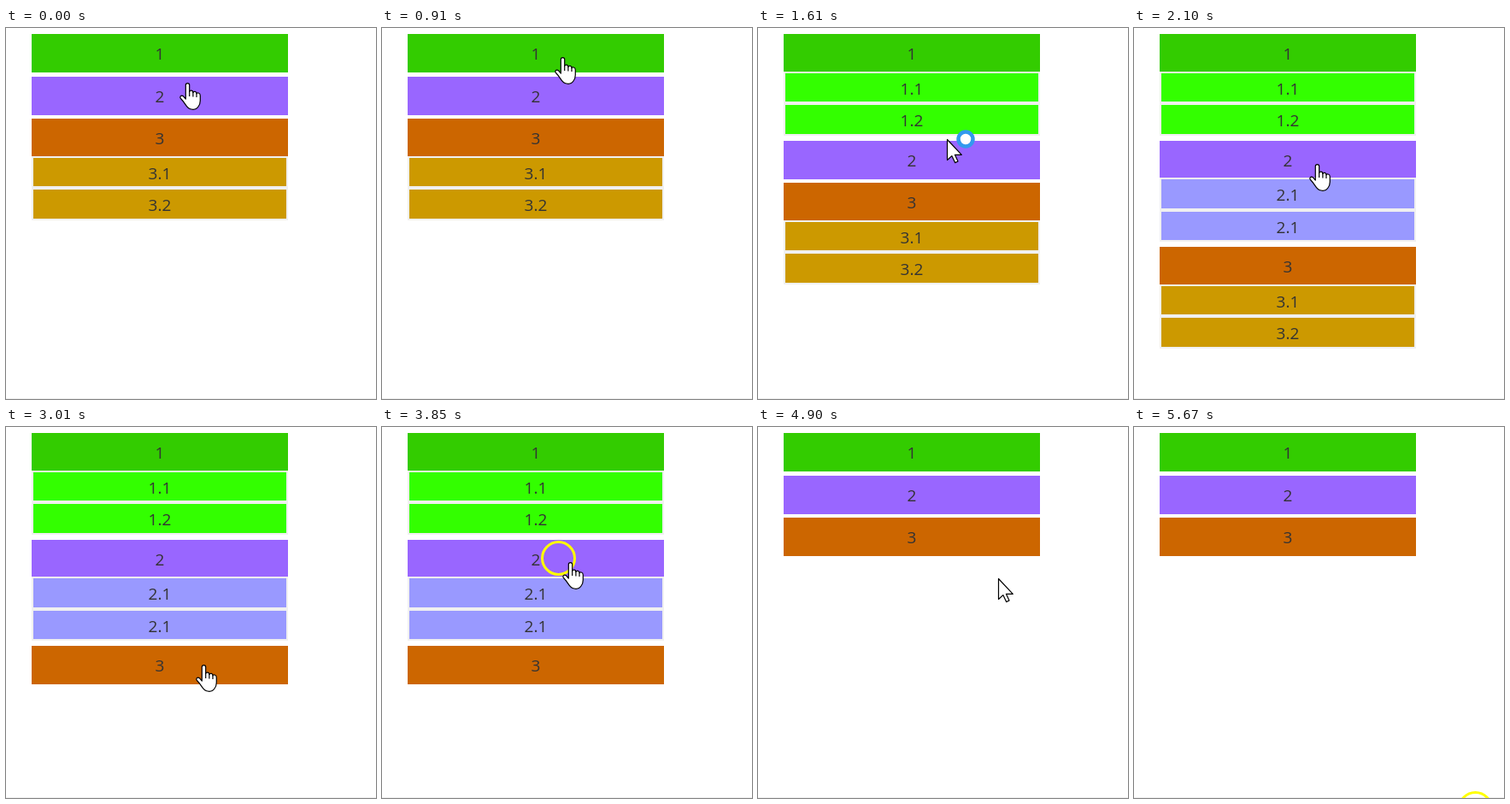
An HTML page with a canvas for the animation above (5.81 s loop, 433 by 434 pixels).

```html
<!DOCTYPE html>
<html lang="en">
<head>
<meta charset="utf-8">
<title>Accordion menu</title>
<style>
  html, body { margin: 0; width: 100%; height: 100%; overflow: hidden; background: #fff; }
  canvas { display: block; }
</style>
</head>
<body>
<canvas id="stage" width="433" height="434"></canvas>
<script>
const ctx = document.getElementById('stage').getContext('2d');
const LOOP = 5810, STEP = 70;
const LEFT = 30, WIDTH = 300, TOP = 7, PITCH = 49.6, PANEL = 75.1;

const menu = [
  { label: '1', head: '#33cc00', body: '#33ff00', items: ['1.1', '1.2'], open: [980, 4690] },
  { label: '2', head: '#9966ff', body: '#9999ff', items: ['2.1', '2.1'], open: [2100, 3990] },
  { label: '3', head: '#cc6600', body: '#cc9900', items: ['3.1', '3.2'], open: [0, 3010] }
];

const start = { x: 203, y: 64 };
const moves = [
  { at: 140, steps: 5, x: 202, y: 41, bow: 2 },
  { at: 560, steps: 4, x: 202, y: 34, bow: 0 },
  { at: 1330, steps: 8, x: 205, y: 159, bow: 9.5, busy: true },
  { at: 2380, steps: 6, x: 222, y: 278, bow: 2, busy: true },
  { at: 3220, steps: 6, x: 211, y: 158, bow: 0 },
  { at: 4200, steps: 5, x: 199, y: 29, bow: 0 },
  { at: 4830, steps: 8, x: 404, y: 451, bow: 0 }
];

const clicks = [[840, 910], [1960, 2100], [2870, 3010], [3850, 3990], [4620, 4690], [5670, LOOP]];

const handShape = new Path2D(
  'M7.3 19 V2.8 Q7.3 .7 9.5 .7 Q11.7 .7 11.7 2.8 V10.5 Q12 9 14 9.2 Q15.9 9.4 15.9 11.5' +
  ' Q16.3 10 18.2 10.4 Q20 10.8 20 12.8 Q20.5 11.4 22.3 12 Q24.3 12.6 24.3 15 V21' +
  ' Q24.3 25 22 28 Q19.8 31.3 16 31.3 Q11.5 31.3 9 28.2 C6.5 25 4.5 21.5 1.5 18.5' +
  ' Q.2 17 1.2 15.8 Q2.6 14.4 4.6 15.8 Z');
const knuckles = new Path2D('M11.7 10 V16 M15.9 11 V16.5 M20 12.5 V17');
const arrowShape = new Path2D('M.5 .5 V24.5 L5.8 19.6 L9.6 27.6 L13 26 L9.4 18.3 H17.3 Z');

const inside = (t, [from, to]) => t >= from && t < to;
const within = (v, a, b) => v >= a && v < b;

function layout(t) {
  let y = TOP;
  return menu.map(m => {
    const row = { ...m, y, shown: inside(t, m.open) };
    y += PITCH + (row.shown ? PANEL : 0);
    return row;
  });
}

function cursorAt(t) {
  let pos = { ...start, busy: false };
  for (const m of moves) {
    if (t < m.at) break;
    const k = Math.min(1, (Math.floor((t - m.at) / STEP) + 1) / m.steps);
    const u = 1 - Math.pow(1 - k, 1.5);
    pos = {
      x: pos.x + (m.x - pos.x) * u + m.bow * 4 * u * (1 - u),
      y: pos.y + (m.y - pos.y) * u,
      busy: !!m.busy
    };
  }
  return { x: Math.round(pos.x), y: Math.round(pos.y), busy: pos.busy };
}

function bar(color, x, top, w, bottom) {
  const y = Math.round(top);
  ctx.fillStyle = color;
  ctx.fillRect(x, y, w, Math.round(bottom) - y);
}

function label(text, middle, color = '#333') {
  ctx.fillStyle = color;
  ctx.fillText(text, LEFT + WIDTH / 2, Math.round(middle + 7));
}

function drawRow(row, t) {
  const { y } = row;
  bar(row.head, LEFT, y, WIDTH, y + (row.shown ? 43.7 : 44.9));
  const tinted = row.label === '3' && inside(t, [3990, 4690]);
  label(row.label, y + 23, tinted ? '#4fc400' : '#333');
  if (!row.shown) return;
  bar('#f0f0f0', LEFT, y + 43.7, WIDTH, y + 118.5);
  bar(row.body, LEFT + 2, y + 45.7, WIDTH - 4, y + 79.05);
  bar(row.body, LEFT + 2, y + 82.9, WIDTH - 4, y + 116.6);
  label(row.items[0], y + 63.7);
  label(row.items[1], y + 101);
}

function ring(x, y, r, width, color) {
  ctx.beginPath();
  ctx.arc(x, y, r, 0, Math.PI * 2);
  ctx.lineWidth = width;
  ctx.strokeStyle = color;
  ctx.stroke();
}

function drawShape(shape, x, y, detail) {
  ctx.save();
  ctx.translate(x, y);
  ctx.lineWidth = 1.2;
  ctx.lineJoin = 'round';
  ctx.fillStyle = '#fff';
  ctx.strokeStyle = '#000';
  ctx.fill(shape);
  ctx.stroke(shape);
  if (detail) ctx.stroke(detail);
  ctx.restore();
}

function drawCursor(c, rows) {
  const overHead = within(c.x + 10, LEFT, LEFT + WIDTH) &&
    rows.some(r => within(c.y, r.y, r.y + 44.5));
  if (overHead) {
    drawShape(handShape, c.x, c.y, knuckles);
    return;
  }
  drawShape(arrowShape, c.x + 10, c.y);
  if (c.busy) {
    ctx.beginPath();
    ctx.arc(c.x + 32, c.y, 8, 0, Math.PI * 2);
    ctx.fillStyle = '#fff';
    ctx.fill();
    ring(c.x + 32, c.y, 8.5, 4.5, '#3399ee');
  }
}

function draw(now) {
  const t = now % LOOP;
  const rows = layout(t);
  const cursor = cursorAt(t);
  ctx.fillStyle = '#fff';
  ctx.fillRect(0, 0, 433, 434);
  bar('#f0f0f0', 0, 433, 433, 434);
  ctx.font = '19px "Open Sans", "Noto Sans", sans-serif';
  ctx.textAlign = 'center';
  rows.forEach(row => drawRow(row, t));
  if (clicks.some(span => inside(t, span))) {
    ring(cursor.x - 4.5, cursor.y - 4.5, 19, 3, '#ffff00');
  }
  drawCursor(cursor, rows);
}

function tick() {
  draw(performance.now());
  requestAnimationFrame(tick);
}
tick();
</script>
</body>
</html>
```
